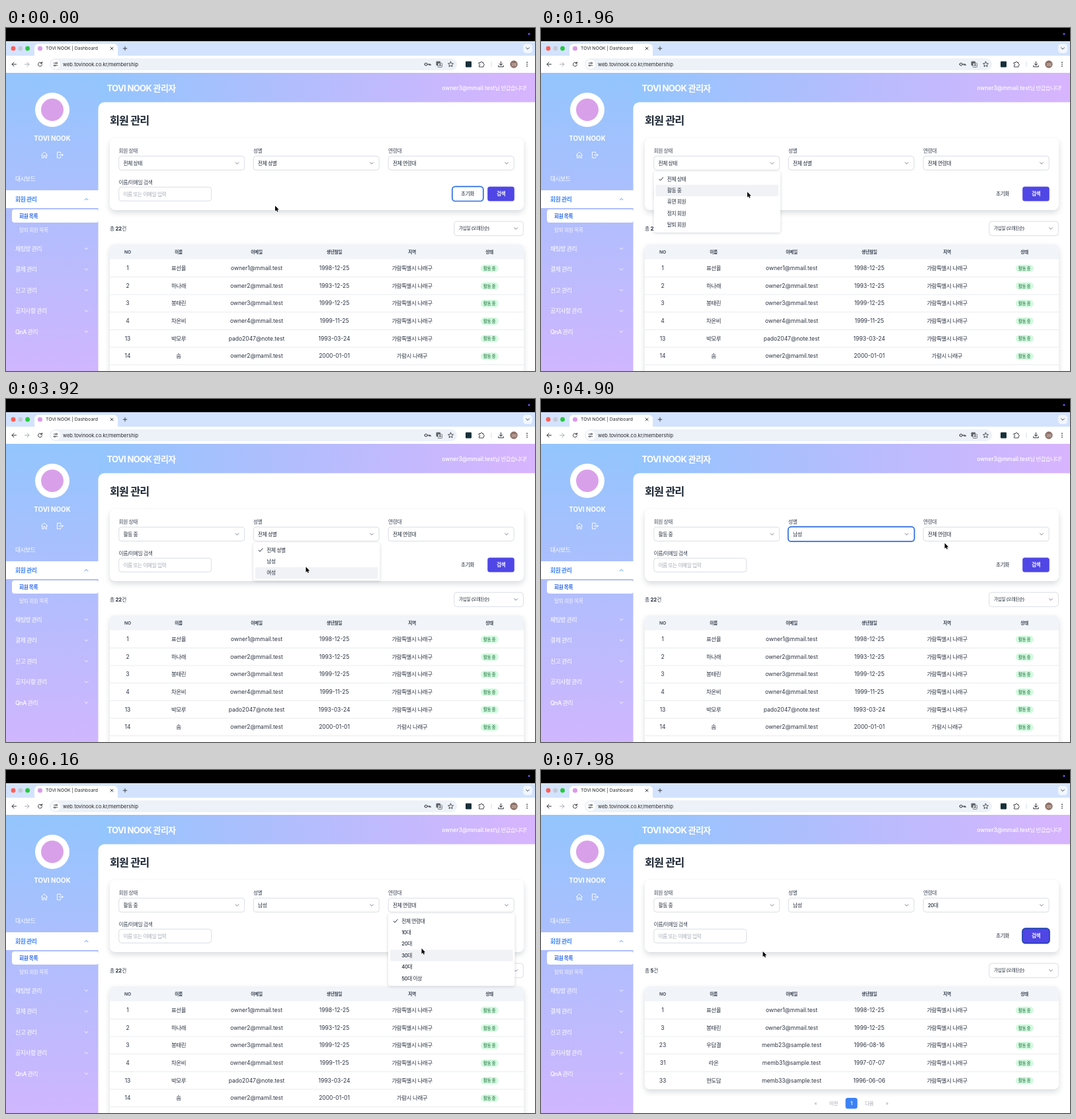
Recreate the animation shown at these times as an HTML page with a canvas. Size 800 by 520 pixels, loop 8000 ms.

```html
<!DOCTYPE html>
<html lang="ko">
<head>
<meta charset="utf-8">
<title>Dashboard</title>
<style>
  html, body { margin: 0; width: 100%; height: 100%; overflow: hidden; background: #fff; }
  canvas { display: block; width: 800px; height: 520px; }
</style>
</head>
<body>
<canvas id="stage"></canvas>
<script>
const W = 800, H = 520, LOOP = 8000;
const canvas = document.getElementById('stage');
const ctx = canvas.getContext('2d');
const dpr = window.devicePixelRatio || 1;
canvas.width = W * dpr;
canvas.height = H * dpr;

const FONT = 'Inter, "Noto Sans CJK KR", "Noto Sans CJK", sans-serif';
const INK = '#1f2937', LINE = '#d1d5db', BLUE = '#2563eb', INDIGO = '#4f46e5';
const BRAND = 'TOVI NOOK';

const clamp = v => Math.max(0, Math.min(1, v));
const ease = v => v * v * (3 - 2 * v);

// Fades in after `on` and out after `off`.
const pulse = (t, on, off, len = 140) => clamp((t - on) / len) * (1 - clamp((t - off) / len));

function text(str, x, y, size, color = INK, weight = 400, align = 'left') {
  ctx.font = `${weight} ${size}px ${FONT}`;
  ctx.letterSpacing = /[가-힣]/.test(str) ? `${-size * 0.05}px` : '0px';
  ctx.textAlign = align;
  ctx.fillStyle = color;
  ctx.fillText(str, x, y + size * 0.36);
  return ctx.measureText(str).width;
}

function rect(x, y, w, h, color) {
  ctx.fillStyle = color;
  ctx.fillRect(x, y, w, h);
}

function box(x, y, w, h, r, fill, stroke, width = 0.8) {
  ctx.beginPath();
  ctx.roundRect(x, y, w, h, r);
  if (fill) { ctx.fillStyle = fill; ctx.fill(); }
  if (stroke) { ctx.strokeStyle = stroke; ctx.lineWidth = width; ctx.stroke(); }
}

function disc(x, y, r, color) {
  ctx.beginPath();
  ctx.arc(x, y, r, 0, Math.PI * 2);
  ctx.fillStyle = color;
  ctx.fill();
}

function icon(d, x, y, color, width = 1, fill = false) {
  ctx.save();
  ctx.translate(x, y);
  ctx.lineCap = ctx.lineJoin = 'round';
  ctx.lineWidth = width;
  ctx.strokeStyle = ctx.fillStyle = color;
  const path = new Path2D(d);
  if (fill) ctx.fill(path);
  else ctx.stroke(path);
  ctx.restore();
}

function chevron(x, y, color, up = false, s = 2.4) {
  const k = up ? -s / 2 : s / 2;
  icon(`M${-s} ${-k}L0 ${k}L${s} ${-k}`, x, y, color, 0.9);
}

function shadowed(alpha, blur, dy, draw) {
  ctx.save();
  ctx.shadowColor = `rgba(30,41,59,${alpha})`;
  ctx.shadowBlur = blur * dpr;
  ctx.shadowOffsetY = dy * dpr;
  draw();
  ctx.restore();
}

function gradient(x0, y0, x1, y1) {
  const g = ctx.createLinearGradient(x0, y0, x1, y1);
  g.addColorStop(0, '#93c5fd');
  g.addColorStop(1, '#d8b4fe');
  return g;
}

// Sits just outside the control, like a focus outline.
function ring(x, y, w, h, k, color = '#2f6fe4') {
  if (k <= 0) return;
  const out = 0.5 * k;
  ctx.globalAlpha = k;
  box(x - out, y - out, w + out * 2, h + out * 2, 4 + out, null, color, 0.7 + k);
  ctx.globalAlpha = 1;
}

const selects = [
  { x: 170.5, label: '회원 상태', items: ['전체 상태', '활동 중', '휴면 회원', '정지 회원', '탈퇴 회원'],
    pick: 1, open: 1000, close: 2350, set: 2500, focus: 2660, blur: 3080 },
  { x: 374, label: '성별', items: ['전체 성별', '남성', '여성'],
    pick: 1, open: 3080, close: 4560, set: 4620, focus: 4700, blur: 5230 },
  { x: 578, label: '연령대', items: ['전체 연령대', '10대', '20대', '30대', '40대', '50대 이상'],
    pick: 2, open: 5230, close: 6600, set: 6650, focus: 6740, blur: 7200 }
];
const SEARCH = 7200, RESULT = 7300;

const CITY = '가람특별시 나래구';
const members = [
  [1, '표선율', 'owner1@mmail.test', '1998-12-25', CITY],
  [2, '하나래', 'owner2@mmail.test', '1993-12-25', CITY],
  [3, '봉태린', 'owner3@mmail.test', '1999-12-25', CITY],
  [4, '차온비', 'owner4@mmail.test', '1999-11-25', CITY],
  [13, '박모루', 'pado2047@note.test', '1993-03-24', CITY],
  [14, '솜', 'owner2@mamil.test', '2000-01-01', '가람시 나래구']
];
const found = [
  members[0],
  members[2],
  [23, '우담결', 'memb23@sample.test', '1996-08-16', CITY],
  [31, '라온', 'memb31@sample.test', '1997-07-07', CITY],
  [33, '현도담', 'memb33@sample.test', '1996-06-06', CITY]
];

// Pointer stops: time, x, y
const stops = [
  [0, 407, 269.5], [250, 407, 269.5], [850, 300, 206], [1150, 300, 206],
  [1850, 312, 248.5], [2250, 312, 248.5], [2730, 438, 220], [2950, 452, 206],
  [3200, 452, 206], [3680, 456, 264], [3920, 453.5, 254.5], [4250, 452, 247],
  [4500, 452, 247], [4900, 610.5, 218.5], [5100, 622, 206], [5350, 622, 206],
  [5900, 632, 284], [6160, 628.5, 270.5], [6350, 627, 263], [6560, 627, 263],
  [7050, 745, 252], [7250, 745, 252], [7850, 335.5, 275], [LOOP, 335.5, 275]
];

function pointer(t) {
  const i = Math.max(1, stops.findIndex(s => s[0] >= t));
  const [t0, x0, y0] = stops[i - 1], [t1, x1, y1] = stops[i];
  const k = ease(clamp((t - t0) / (t1 - t0)));
  return { x: x0 + (x1 - x0) * k, y: y0 + (y1 - y0) * k };
}

function drawBrowser() {
  const dark = '#30343a';
  rect(0, 0, W, 20, '#000');
  disc(791, 9, 1.6, '#6d55f5');
  rect(0, 20, W, 23, '#d3e3fd');
  ['#ff5f57', '#c3cad6', '#28c840'].forEach((c, i) => disc(11 + i * 10.8, 31, 3.4, c));
  box(43, 24, 126, 20, [6, 6, 0, 0], '#fff');
  disc(51.5, 31, 3.6, '#d99be8');
  text(BRAND + ' | Dashboard', 60, 31, 6.8, '#25282c');
  icon('M-2 -2L2 2M2 -2L-2 2', 160, 31, dark, 0.9);
  icon('M-2.8 0H2.8M0 -2.8V2.8', 180, 31, dark, 0.9);
  box(782, 24, 14, 14, 4.5, '#f1f6ff');
  chevron(789, 31, dark);

  rect(0, 42, W, 26, '#fff');
  icon('M3.5 0H-3M0 -3L-3 0L0 3', 12, 55, dark);
  icon('M-3.5 0H3M0 -3L3 0L0 3', 32, 55, '#a8acb2');
  icon('M2.4 -1.8A3 3 0 1 0 3 .6M3 -3.5V-1.3H.8', 51.5, 55, dark);
  box(66, 46, 616, 18, 9, '#edf1f8');
  disc(75, 55, 7, '#fff');
  icon('M-3 -1.8H.2M-.2 1.8H3M-3 1.8H-2.4M2.4 -1.8H3M.2 -1.8a1.1 1.1 0 1 0 2.2 0a1.1 1.1 0 1 0 -2.2 0M-2.4 1.8a1.1 1.1 0 1 0 2.2 0a1.1 1.1 0 1 0 -2.2 0', 75, 55, dark, 0.8);
  text('web.tovinook.co.kr/membership', 86, 55, 7.5, '#25282c');

  icon('M-4.4 0a2 2 0 1 0 4 0a2 2 0 1 0 -4 0M-.4 0H4.6V1.6M2.6 0V1.6', 637.5, 55, dark, 1);
  box(650.5, 50.5, 6.5, 6.5, 1, '#5f6368');
  box(653.2, 53.2, 6.3, 6.3, 1, '#edf1f8', '#5f6368');
  text('A', 656.4, 56.4, 4.8, dark, 600, 'center');
  icon('M0 -4L1.2 -1.4L4 -1.1L1.9 .8L2.5 3.6L0 2.1L-2.5 3.6L-1.9 .8L-4 -1.1L-1.2 -1.4Z', 672.5, 55, dark, 0.85);
  box(695, 50.5, 9, 9, 1, '#18303a');
  icon('M-3.5 -2.5H-1C-1 -5 1.2 -5 1.2 -2.5H3V-.4C5 -.4 5 1.8 3 1.8V4H-3.5V1.8C-1.7 1.8 -1.7 -.4 -3.5 -.4Z', 719, 55, dark, 0.9);
  rect(733.6, 51, 0.8, 8, '#c9d7ee');
  icon('M0 -4V1.5M-2.4 -.8L0 1.6L2.4 -.8M-3.8 2V3.8H3.8V2', 748.5, 55, dark);
  disc(768, 55, 5.7, '#8d6e63');
  text('회원', 768, 55, 4.2, '#fff', 400, 'center');
  for (let i = -1; i < 2; i++) disc(788, 55 + i * 2.8, 0.85, dark);
}

function drawSidebar() {
  rect(0, 68, 142, H - 68, gradient(0, 68, 0, H + 60));
  rect(140, 68, W - 140, 60, gradient(140, 0, W, 0));
  disc(70, 124, 26, '#fff');
  disc(70, 124, 17, '#d9a0ea');
  text(BRAND, 70, 167, 9.8, '#fff', 700, 'center');
  icon('M-4.6 0L0 -4.6L4.6 0M-3.4 -1V4.5H-1.2V1H1.2V4.5H3.4V-1', 58, 192.5, '#fff', 0.9);
  icon('M1 -2.5V-4.4H-4V4.4H1V2.5M-1.2 0H4.8M2.8 -2L4.8 0L2.8 2', 81.5, 192.5, '#fff', 0.9);

  text('대시보드', 14, 228.5, 8.7, '#fff', 500);
  rect(0, 246, 140, 27, '#fff');
  text('회원 관리', 14, 259.5, 8.8, '#3b82f6', 600);
  chevron(121.5, 259.5, '#3b82f6', true);
  box(9, 275, 131, 20, 4, '#fff');
  text('회원 목록', 20, 285, 7.7, BLUE, 700);
  text('탈퇴 회원 목록', 20, 306.5, 7.7, '#f5f3ff');
  ['채팅방 관리', '결제 관리', '신고 관리', '공지사항 관리', 'QnA 관리'].forEach((s, i) => {
    const y = 334.5 + i * 31.5;
    text(s, 14, y, 8.8, '#fff', 500);
    chevron(121.5, y, '#fff');
  });

  text(BRAND + ' 관리자', 152.5, 91, 13, '#fff', 700);
  const greeting = text('님 반갑습니다!', 787, 91, 8.4, '#fff', 500, 'right');
  text(members[2][2], 787 - greeting, 91, 8.4, '#fff', 500, 'right');
}

function drawFilters(t) {
  box(139.5, 112.5, W - 130, H - 103, 9, '#fff');
  text('회원 관리', 157, 140.3, 16.2, INK, 700);
  shadowed(0.17, 9, 4, () => box(157, 167, 626, 109, 8, '#fff'));

  for (const s of selects) {
    text(s.label, s.x, 186, 7.7, '#374151', 500);
    box(s.x + 0.2, 194.2, 190, 21.2, 4, '#fff', LINE);
    text(s.items[t >= s.set ? s.pick : 0], s.x + 7, 204.8, 7.7, INK, 500);
    chevron(s.x + 179, 205, '#6b7280');
    ring(s.x + 0.2, 194.2, 190, 21.2, pulse(t, s.focus, s.blur));
  }

  text('이름/이메일 검색', 170.5, 234, 7.7, '#374151', 500);
  box(170.7, 241.2, 140, 21, 4, '#fff', LINE);
  text('이름 또는 이메일 입력', 177.5, 252, 7.6, '#a3a9b4');
  text('초기화', 698, 251.2, 7.6, INK, 500, 'center');
  ring(675.3, 240.8, 46, 21.2, pulse(t, -200, selects[0].open));
  box(728.2, 240.4, 40.6, 22, 3.5, INDIGO);
  ring(728.5, 240.7, 40, 21.4, pulse(t, SEARCH, LOOP + 200), '#1e40af');
  text('검색', 748.5, 251.2, 7.6, '#fff', 600, 'center');
}

const COLS = [184, 261, 379, 496.5, 614, 731];
const ROW = 26.65;

function drawTable(t) {
  const done = t >= RESULT;
  const rows = done ? found : members;
  let x = 157;
  x += text('총 ', x, 304, 7.7, '#374151');
  x += text(done ? '5' : '22', x, 304, 7.7, INK, 700);
  text('건', x, 304, 7.7, '#374151');
  box(677.8, 293.2, 104.5, 21.6, 4, '#fff', LINE);
  text('가입일 (오래된순)', 685, 304, 6.6, INK, 500);
  chevron(771, 304, '#6b7280');

  const height = done ? 156 : 230;
  shadowed(0.17, 9, 4, () => box(157, 328, 626, height, 7, '#fff'));
  box(157, 328, 626, 22.5, [7, 7, 0, 0], '#f1f4f8');
  ['NO', '이름', '이메일', '생년월일', '지역', '상태'].forEach((s, i) =>
    text(s, COLS[i], 339.5, 6.7, '#374151', 600, 'center'));

  rows.forEach((row, i) => {
    const y = 364 + i * ROW;
    row.forEach((v, c) => text(String(v), COLS[c], y, 8.5, '#2b3442', 400, 'center'));
    box(717.8, y - 5.2, 27, 11.2, 5.6, '#d2fadf');
    text('활동 중', COLS[5], y + 0.5, 6.6, '#166534', 500, 'center');
    if (!done || i < rows.length - 1) rect(157, y + 13, 626, 0.8, '#e5e7eb');
  });

  if (done) {
    const page = (s, px) => text(s, px, 505, 7.4, '#9ca3af', 400, 'center');
    page('«', 415.5);
    page('이전', 442.5);
    page('다음', 496.5);
    page('»', 523.5);
    box(460.5, 497, 18, 16.5, 3.5, '#3b82f6');
    text('1', 469.5, 505, 7.4, '#fff', 600, 'center');
  }
}

const ITEM = 17.35;

function drawMenu(t) {
  const s = selects.find(m => t >= m.open + 70 && t < m.close + 120);
  if (!s) return;
  const hover = Math.round((pointer(t - 70).y - 229) / ITEM);
  const height = 22.5 + ITEM * (s.items.length - 1);
  ctx.globalAlpha = 1 - clamp((t - s.close) / 120);
  shadowed(0.2, 4, 1, () => box(s.x, 218, 191.5, height, 3, '#fff'));
  s.items.forEach((item, i) => {
    const y = 229 + i * ITEM;
    if (i === hover) box(s.x + 3, y - 8.6, 185.5, ITEM, 1.5, '#f1f2f6');
    text(item, s.x + 20.3, y, 7.7, INK, 500);
  });
  icon('M-2.8 .2L-.9 2.2L3 -2.4', s.x + 11, 229, INK, 1);
  ctx.globalAlpha = 1;
}

function drawPointer(t) {
  const { x, y } = pointer(t);
  const arrow = 'M0 0V8.2L1.9 6.5L3.1 9.3L4.5 8.7L3.3 6H5.8Z';
  icon(arrow, x, y, '#fff', 1.4);
  icon(arrow, x, y, '#000', 1, true);
}

function draw(t) {
  ctx.setTransform(dpr, 0, 0, dpr, 0, 0);
  ctx.textBaseline = 'alphabetic';
  rect(0, 0, W, H, '#fff');
  drawBrowser();
  drawSidebar();
  drawFilters(t);
  drawTable(t);
  drawMenu(t);
  drawPointer(t);
}

const start = performance.now();
function tick() {
  draw((performance.now() - start) % LOOP);
  requestAnimationFrame(tick);
}
tick();
</script>
</body>
</html>
```
